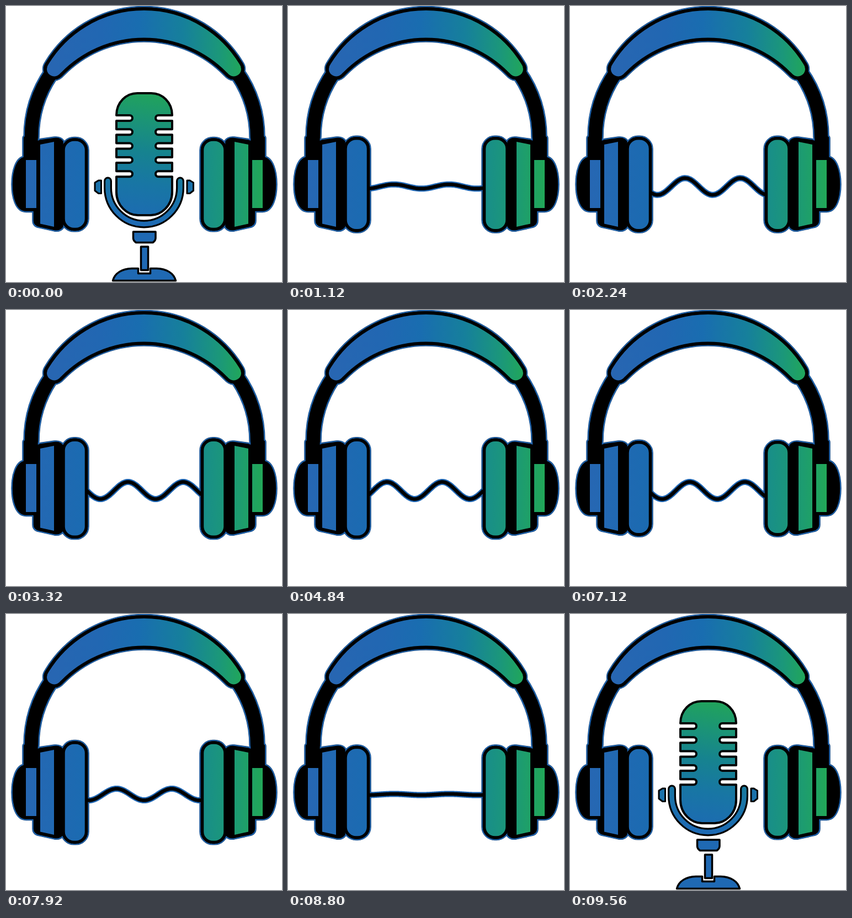
An HTML page that plays this animation: 500 px wide and 500 px high, repeating every 9.6 s.

```html
<!DOCTYPE html>
<html lang="en">
<head>
<meta charset="utf-8">
<title>Headphones and microphone</title>
<style>
  html, body { margin: 0; width: 100%; height: 100%; overflow: hidden; background: #fff; }
  svg { display: block; width: 100vw; height: 100vh; }
</style>
</head>
<body>
<svg viewBox="0 0 500 500">
  <defs>
    <linearGradient id="bandFill" gradientUnits="userSpaceOnUse" x1="74" y1="0" x2="428" y2="0">
      <stop offset="0" stop-color="#2866b2"/>
      <stop offset=".28" stop-color="#2167b2"/>
      <stop offset=".47" stop-color="#196db0"/>
      <stop offset=".7" stop-color="#16809b"/>
      <stop offset=".88" stop-color="#1b977a"/>
      <stop offset="1" stop-color="#21a759"/>
    </linearGradient>
    <linearGradient id="leftFill" gradientUnits="userSpaceOnUse" x1="30" y1="0" x2="148" y2="0">
      <stop offset="0" stop-color="#2767b3"/>
      <stop offset="1" stop-color="#1a6bb1"/>
    </linearGradient>
    <linearGradient id="rightFill" gradientUnits="userSpaceOnUse" x1="34" y1="0" x2="148" y2="0">
      <stop offset="0" stop-color="#22a857"/>
      <stop offset=".4" stop-color="#1d9c70"/>
      <stop offset="1" stop-color="#188d8b"/>
    </linearGradient>
    <linearGradient id="micFill" gradientUnits="userSpaceOnUse" x1="272" y1="160" x2="232" y2="390">
      <stop offset="0" stop-color="#21a35b"/>
      <stop offset=".22" stop-color="#1b9476"/>
      <stop offset=".45" stop-color="#16838f"/>
      <stop offset=".7" stop-color="#1876a4"/>
      <stop offset="1" stop-color="#1d6ab3"/>
    </linearGradient>

    <path id="band" d="M75 103A205.200 205.200 0 0 1 425 103C428 107 429 111 429 114C429 124 421 130.500 412 130.500Q405 130.500 398 122.500A207.600 207.600 0 0 0 102 122.500Q95 130.500 88 130.500C79 130.500 71 124 71 114C71 111 72 107 75 103Z"/>
    <rect id="pad" x="104" width="41.5" rx="19"/>
    <g id="shell">
      <path d="M75 115A213.500 213.500 0 0 0 36.500 238H55.500A194.500 194.500 0 0 1 88 130Z"/>
      <path d="M34.500 239H55V282H34.500Z"/>
      <path d="M36 276C21 276 14.500 300 14.500 323S21 369 36 369H58V276Z"/>
      <path d="M57.500 249Q58 246 63 245L88 241.500Q97 240.500 101 246V399Q97 405 88 403.500L61 397.500Q52.500 396 52.500 389V340Z"/>
      <use href="#pad"/>
    </g>
    <g id="panels">
      <path stroke="none" d="M36 279H55V366H36Z"/>
      <path stroke="none" d="M62 251L87 246V400L62 394.500Z"/>
      <use href="#pad" stroke="#000" stroke-width="5.5"/>
    </g>
    <g id="outline">
      <use href="#band"/>
      <use href="#shell"/>
      <use href="#shell" transform="translate(501) scale(-1 1)"/>
    </g>
    <path id="wire" fill="none"/>
    <path id="cradle" fill="none" stroke-linecap="round" d="M184.500 317V329.500A65.500 65.500 0 0 0 315.500 329.500V317"/>
    <path id="knob" d="M172.500 316H167.500L161 320V334.500L167.500 339.500H172.500Z"/>
  </defs>

  <g class="on-air">
    <use href="#wire" stroke="#1f66b3" stroke-width="11"/>
  </g>
  <g stroke-linejoin="round">
    <use href="#outline" stroke="#143f70" stroke-width="10.4"/>
    <use href="#outline" stroke="#1f66b3" stroke-width="9.2"/>
  </g>
  <g class="on-air">
    <use href="#wire" stroke="#000" stroke-width="6.5"/>
  </g>
  <use href="#outline" stroke="#000" stroke-width="5.5" stroke-linejoin="round"/>
  <use href="#band" fill="url(#bandFill)" stroke="#000" stroke-width="6"/>
  <use href="#panels" fill="url(#leftFill)"/>
  <use href="#panels" fill="url(#rightFill)" transform="translate(501) scale(-1 1)"/>

  <g id="mic" fill="url(#micFill)" stroke="#000" stroke-width="4" stroke-linejoin="round">
    <path id="capsule"/>
    <use href="#cradle" stroke-width="15"/>
    <use href="#cradle" stroke="url(#micFill)" stroke-width="8.5"/>
    <g fill="#1b72ab" stroke-width="3">
      <use href="#knob"/>
      <use href="#knob" transform="translate(500.5) scale(-1 1)"/>
    </g>
    <g fill="#1f69b3" stroke-width="3.5">
      <path d="M230.500 409H271V420.500Q271 425 266 428.500H235.500Q230.500 425 230.500 420.500Z"/>
      <path d="M244.500 436H257.500V478.500H244.500Z"/>
      <path d="M193.500 497.500C197 484 210 476 228 475.500H239.500V484.500H261.500V475.500H273C291 476 304 484 307.500 497.500Z"/>
    </g>
  </g>
</svg>
<script>
const LOOP = 9600, STEP = 40, SWAP = 500;
const WAVE = { mid: 327, amp: 15.5, length: 100, period: 960, rise: 1900 };
const PULSE = { mid: 323.2, half: 81.2, grow: 9, period: 240, rise: 600 };
const TAU = Math.PI * 2;
const get = id => document.getElementById(id);
const wire = get('wire'), pad = get('pad'), mic = get('mic');
const onAir = document.querySelectorAll('.on-air');
const clamp = v => Math.max(0, Math.min(1, v));
const smooth = v => v * v * (3 - 2 * v);

function capsulePath() {
  const slots = [0, 1, 2, 3, 4].map(i => 198 + 25.3 * i);
  const left = slots.slice().reverse().map(y => `V${y + 10}H224a5 5 0 0 0 0 -10H200`).join('');
  const right = slots.map(y => `V${y}H276a5 5 0 0 0 0 10H301`).join('');
  return 'M200 337' + left + 'C200 174 218 158 238 158H263C283 158 301 174 301 198' +
    right + 'V337C301 362 281 379 262 379H239C220 379 200 362 200 337Z';
}

function wirePath(t, amp) {
  let d = '';
  for (let x = 146; x <= 355; x += 2) {
    const phase = (x - 221) / WAVE.length - (t - 3320) / WAVE.period;
    d += (d ? 'L' : 'M') + x + ' ' + (WAVE.mid - amp * Math.cos(TAU * phase)).toFixed(2);
  }
  return d;
}

function draw(t) {
  // time since the swap, or until the swap back
  const inside = Math.min(t - SWAP, LOOP - SWAP - t);
  const live = inside > 0;
  mic.style.display = live ? 'none' : '';
  onAir.forEach(g => { g.style.display = live ? '' : 'none'; });

  wire.setAttribute('d', wirePath(t, WAVE.amp * smooth(clamp(inside / WAVE.rise))));

  const beat = (1 + Math.cos(TAU * t / PULSE.period)) / 2;
  const half = PULSE.half + PULSE.grow * beat * clamp(inside / PULSE.rise) ** 2;
  pad.setAttribute('y', PULSE.mid - half);
  pad.setAttribute('height', half * 2);
}

get('capsule').setAttribute('d', capsulePath());
const start = performance.now();
function tick() {
  const t = (performance.now() - start) % LOOP;
  draw(Math.floor(t / STEP) * STEP);
  requestAnimationFrame(tick);
}
tick();
</script>
</body>
</html>
```
